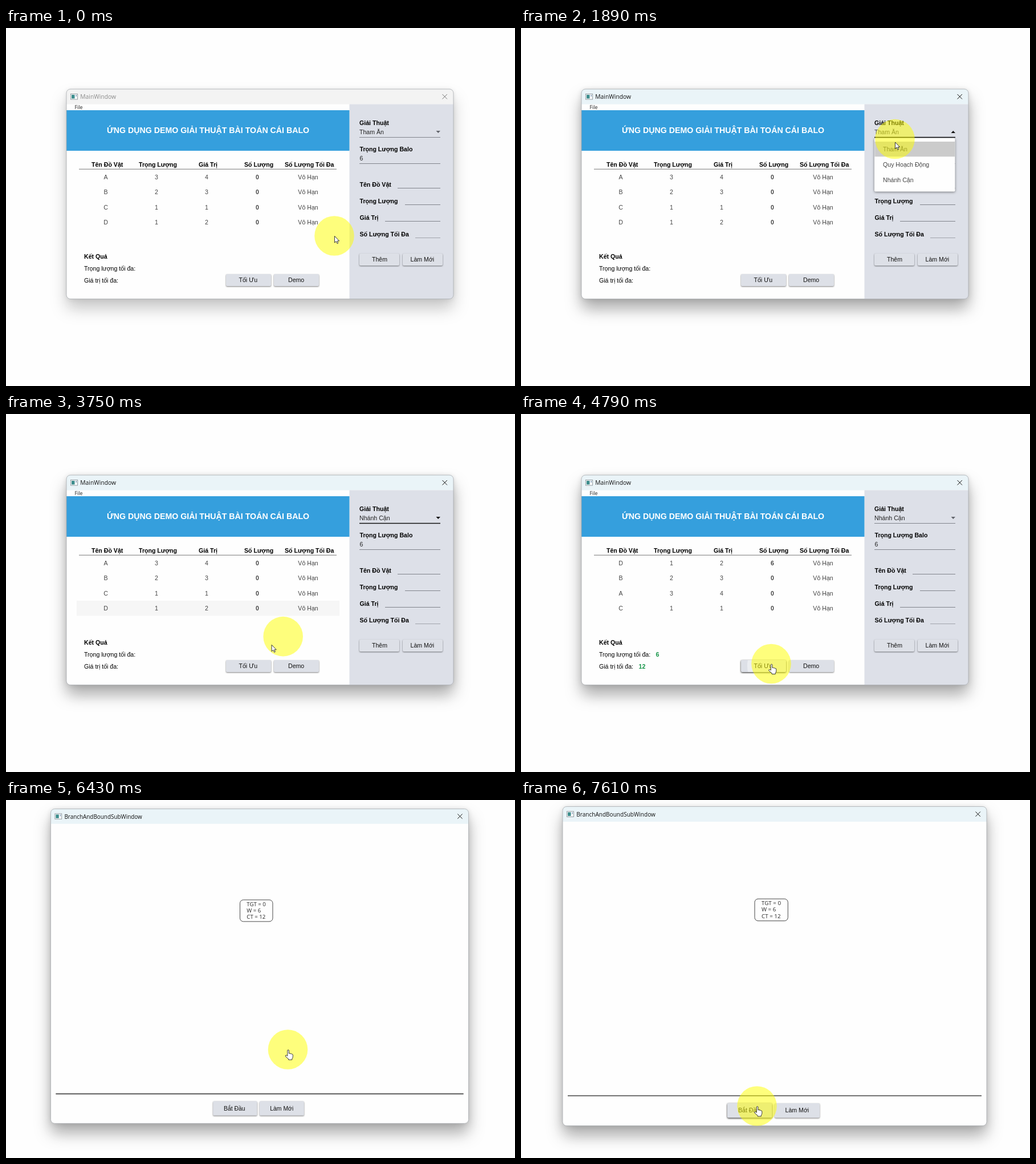
Write an HTML page that moves like this. It is 893 by 627 pixels and loops after 8000 ms.

```html
<!DOCTYPE html>
<html lang="vi">
<head>
<meta charset="utf-8">
<title>Balo</title>
<style>
  html, body { margin: 0; width: 100%; height: 100%; overflow: hidden; background: #fefefe; }
  svg { display: block; width: 893px; height: 627px; font: 10.6px "Liberation Sans", Arial, sans-serif; }
  .b { font-weight: bold; }
  .ui { font-family: "Open Sans", "Noto Sans", sans-serif; }
  .mid { text-anchor: middle; }
  .cell { fill: #444; }
  .frame { fill: #fefefe; filter: drop-shadow(0 17px 14px rgba(0,0,0,.3)) drop-shadow(0 1px 5px rgba(0,0,0,.14)); }
  .idle .frame { filter: drop-shadow(0 17px 14px rgba(0,0,0,.2)) drop-shadow(0 1px 4px rgba(0,0,0,.1)); }
  .edge { fill: none; stroke: #a9adb0; stroke-width: .8; }
  .bar { fill: #eaf4f8; }
  .idle .bar { fill: #f3f3f3; }
  .caption { fill: #111; }
  .close { stroke: #111; fill: none; }
  .idle .caption { fill: #8b8b8b; }
  .idle .close { stroke: #777; }
  .line { stroke: #81848c; }
  .face { fill: #dde0e7; filter: drop-shadow(0 1px 1.2px rgba(0,0,0,.5)); }
  .hot .face { filter: drop-shadow(0 1px 1.5px rgba(0,0,0,.9)); }
  .ripple { fill: #fff; }
  .result { fill: #149447; }
  .sheet { fill: #fefefe; filter: drop-shadow(0 1px 2px rgba(0,0,0,.5)); }
</style>
</head>
<body>
<svg id="stage" viewBox="0 0 893 627"></svg>
<script>
const LOOP = 8000, LAG = 38;
const ROW_TOP = 247.8, ROW_H = 26.4;
const COLUMNS = [175, 264, 352, 441, 530];

const text = (x, y, s, cls = '', extra = '') => `<text x="${x}" y="${y}" class="${cls}" ${extra}>${s}</text>`;
const rect = (x, y, w, h, extra = '') => `<rect x="${x}" y="${y}" width="${w}" height="${h}" ${extra}/>`;
const line = (x1, x2, y, extra = '') => `<path class="line" d="M${x1} ${y}H${x2}" ${extra}/>`;

const button = (id, x, y, w, h, label, labelX) => `
  <g id="${id}">
    <clipPath id="${id}Clip">${rect(x, y, w, h, 'rx="2"')}</clipPath>
    ${rect(x, y, w, h, 'rx="2" class="face"')}
    <circle class="ripple" r="0" clip-path="url(#${id}Clip)"/>
    ${text(labelX, y + h / 2 + 3.6, label, '', 'fill="#111"')}
  </g>`;

// Body is painted between the window surface and its outline.
const windowFrame = (x, y, w, h, title, size, body) => `
  ${rect(x, y, w, h, 'rx="7" class="frame"')}
  <path class="bar" d="M${x} ${y + 26.5}v-19.5q0-7 7-7h${w - 14}q7 0 7 7v19.5z"/>
  ${rect(x + 7.5, y + 8.5, 12, 9.5, 'fill="#fff" stroke="#8a9499" stroke-width=".9"')}
  ${rect(x + 9, y + 10, 5.5, 6.5, 'fill="#3b8c8c"')}
  ${rect(x + 16.5, y + 10, 1.5, 3, 'fill="#7d9ab8"')}
  ${text(x + 24.3, y + 17.3, title, 'ui caption', `font-size="${size}"`)}
  <path class="close" d="M${x + w - 19.5} ${y + 9}l8.4 8.4m0-8.4l-8.4 8.4"/>
  ${body}
  ${rect(x, y, w, h, 'rx="7" class="edge"')}`;

const table = (id, rows) => `<g id="${id}">${rows.map((row, r) =>
  [...row, 'Vô Hạn'].map((cell, c) =>
    text(COLUMNS[c], 264.8 + r * ROW_H, cell, 'mid cell' + (c === 3 ? ' b' : ''))).join('')).join('')}</g>`;

const headers = [[150, 'Tên Đồ Vật'], [233, 'Trọng Lượng'], [338, 'Giá Trị'], [418, 'Số Lượng'], [489, 'Số Lượng Tối Đa']];
const fields = [['Tên Đồ Vật', 687], ['Trọng Lượng', 700], ['Giá Trị', 665], ['Số Lượng Tối Đa', 718]];
const options = ['Tham Ăn', 'Quy Hoạch Động', 'Nhánh Cận'];

const mainBody = `
  <path fill="#dde0e8" d="M602.5 133.5H785V467.500q0 7-7 7H602.500z"/>
  ${text(120.500, 142, 'File', 'ui', 'font-size="8.8" fill="#222"')}
  ${rect(106, 144, 496.5, 71, 'fill="#359fdd"')}
  ${text(177, 184.4, 'ỨNG DỤNG DEMO GIẢI THUẬT BÀI TOÁN CÁI BALO', 'b', 'font-size="14.2" fill="#fff"')}
  ${[0, 1, 2, 3].map(r => rect(124, ROW_TOP + r * ROW_H, 461, ROW_H, 'class="row" fill="#f0f0f0"')).join('')}
  ${headers.map(([x, s]) => text(x, 242.7, s, 'b')).join('')}
  ${line(128, 580, 247.2, 'style="stroke:#777"')}
  ${table('before', [['A', 3, 4, 0], ['B', 2, 3, 0], ['C', 1, 1, 0], ['D', 1, 2, 0]])}
  ${table('after', [['D', 1, 2, 6], ['B', 2, 3, 0], ['A', 3, 4, 0], ['C', 1, 1, 0]])}
  ${text(137, 403.6, 'Kết Quả', 'b')}
  ${text(137, 425, 'Trọng lượng tối đa:')}
  ${text(137, 446, 'Giá trị tối đa:')}
  <g id="results">${text(236.5, 425, 6, 'b result')}${text(206.5, 446, 12, 'b result')}</g>
  ${button('best', 386, 431, 79, 21, 'Tối Ưu', 408.5)}
  ${button('demo', 470, 431, 79, 21, 'Demo', 495)}
  ${text(620, 169.8, 'Giải Thuật', 'b')}
  ${text(620, 186, '', '', 'id="choice" fill="#222"')}
  <path id="arrow" d="M754.500 180h7.500l-3.750 4z"/>
  <path id="underline" d="M620 191.500H762"/>
  ${text(620.5, 215.8, 'Trọng Lượng Balo', 'b')}
  ${text(620.5, 231.5, 6, '', 'fill="#222"')}
  ${line(620, 762, 237.5)}
  ${fields.map(([s, x], i) => text(620.5, 278 + i * 29.1, s, 'b') +
    line(x, 762, 280.5 + i * 29, i === 3 ? 'opacity=".65"' : '')).join('')}
  ${button('add', 620, 395, 70, 21, 'Thêm', 642)}
  ${button('reset', 696, 395, 70, 21, 'Làm Mới', 709.5)}
  <clipPath id="popupClip"><rect id="popupWindow" x="610" y="188" width="162" height="0"/></clipPath>
  <g id="popup" clip-path="url(#popupClip)">
    ${rect(620, 193, 141.5, 93.500, 'rx="2" class="sheet"')}
    ${options.map((s, i) => rect(620.5, 199 + i * 26.5, 140.5, 26.5, 'class="option"') +
      text(635, 216 + i * 26.8, s, '', 'fill="#444"')).join('')}
  </g>`;

const subBody = `
  ${rect(410, 173.2, 58.3, 38.5, 'rx="6" fill="#fefefe" stroke="#333" stroke-width=".9"')}
  ${['TGT = 0', 'W = 6', 'CT = 12'].map((s, i) => text(422, 184 + i * 11.3, s, 'ui', 'font-size="9.8" fill="#222"')).join('')}
  ${line(82, 808, 518, 'style="stroke:#444;stroke-width:1.7"')}
  ${button('start', 362, 531, 78.5, 25.500, 'Bắt Đầu', 381)}
  ${button('again', 445, 531, 79, 25.5, 'Làm Mới', 463.5)}`;

stage.innerHTML = `
  <g id="mainWin">${windowFrame(106, 107, 679, 367.5, 'MainWindow', 10.3, mainBody)}</g>
  <g id="subWin">${windowFrame(73, 11.5, 744, 559, 'BranchAndBoundSubWindow', 10.05, subBody)}</g>
  <circle id="halo" r="34.8" fill="#ff0" fill-opacity=".51"/>
  <g id="pointer" fill="#fff" stroke="#222" stroke-width=".9" stroke-linejoin="round">
    <path id="arrowCursor" d="M.5.5V12L3.200 9.500 5 13.500 6.800 12.700 5.100 9H8.700Z"/>
    <path id="handCursor" d="M-.7 2a1.300 1.300 0 0 1 2.600 0V7q2-.8 2.600.4 2-.6 2.300.7 2-.3 2 1.500V12.500q0 2-1.500 3.700V18h-6.200v-1.500L-3.700 12.500q-1.300-2 .2-2.600 1.300-.2 2.800 1.500Z"/>
  </g>`;

const $ = id => document.getElementById(id);
const rowEls = document.querySelectorAll('.row');
const optionEls = document.querySelectorAll('.option');

// [time, x, y]
const PATH = [
  [0, 576, 364], [480, 576, 364], [750, 595, 312], [950, 619, 225], [1070, 645, 192.5], [1220, 656, 188],
  [1750, 656, 188], [2110, 656, 233], [2300, 657, 250], [2520, 659, 264], [3300, 659, 264], [3560, 588, 324],
  [3750, 466, 403.5], [3900, 438, 434], [4080, 438.500, 436.500], [4200, 439, 437.500], [5210, 439, 437.500],
  [5290, 455, 437.200], [5380, 480, 437], [5480, 494.500, 437], [6840, 494.500, 437],
  [7150, 455, 482], [7400, 421, 529], [7580, 414, 536], [LOOP, 414, 536]
];

const clamp = v => Math.max(0, Math.min(1, v));
const ramp = (t, from, to) => clamp((t - from) / (to - from));
const within = (v, from, to) => v >= from && v < to;
const show = (el, on) => { el.style.display = on ? '' : 'none'; };

function slope(i, axis) {
  const a = PATH[i - 1], p = PATH[i], b = PATH[i + 1];
  const rests = q => q[1] === p[1] && q[2] === p[2];
  if (!a || !b || rests(a) || rests(b)) return 0;
  return (b[axis] - a[axis]) / (b[0] - a[0]);
}

function cursorAt(time) {
  const t = Math.max(0, time);
  let i = 0;
  while (i < PATH.length - 2 && PATH[i + 1][0] <= t) i++;
  const a = PATH[i], b = PATH[i + 1], d = b[0] - a[0], u = (t - a[0]) / d;
  return [1, 2].map(k =>
    (2 * u ** 3 - 3 * u * u + 1) * a[k] + (u ** 3 - 2 * u * u + u) * d * slope(i, k) +
    (3 * u * u - 2 * u ** 3) * b[k] + (u ** 3 - u * u) * d * slope(i + 1, k));
}

// Row highlight fades out after the pointer leaves.
function rowGlow(t, r) {
  for (let k = 0; k <= 12; k++) {
    const [x, y] = cursorAt(t - k * 20);
    if (within(x, 124, 585) && within(y, ROW_TOP + r * ROW_H, ROW_TOP + (r + 1) * ROW_H)) return 1 - k / 13;
  }
  return 0;
}

function ripple(id, t, from, x, y) {
  const el = $(id).querySelector('.ripple'), on = within(t, from, from + 600);
  el.setAttribute('cx', x);
  el.setAttribute('cy', y);
  el.setAttribute('r', on ? 56 * ramp(t, from, from + 400) : 0);
  el.setAttribute('opacity', .4 * (1 - ramp(t, from + 330, from + 600)));
}

function draw(t) {
  const [x, y] = cursorAt(t), [hx, hy] = cursorAt(t - LAG);
  const open = within(t, 1320, 2930), focused = within(t, 1320, 4480), solved = t >= 4520;
  const subOpen = t >= 6220;

  $('mainWin').setAttribute('class', within(t, 1320, 6220) ? '' : 'idle');
  show($('before'), !solved);
  show($('after'), solved);
  show($('results'), solved);
  rowEls.forEach((el, r) => el.setAttribute('opacity', rowGlow(t, r)));

  $('choice').textContent = options[t < 2930 ? 0 : 2];
  $('choice').setAttribute('opacity', open ? .8 : 1);
  $('arrow').setAttribute('fill', focused ? '#111' : '#62656c');
  $('arrow').setAttribute('transform', open ? 'rotate(180 758.25 182)' : '');
  $('underline').setAttribute('stroke', focused ? '#111' : '#81848c');
  $('underline').setAttribute('stroke-width', focused ? 1.7 : 1);

  const grow = 1 - (1 - ramp(t, 1360, 1700)) ** 3;
  $('popupWindow').setAttribute('height', 104 * grow);
  $('popup').setAttribute('opacity', ramp(t, 1340, 1500) * (1 - ramp(t, 2900, 3040)));
  optionEls.forEach((el, i) => {
    const hover = open && within(y, 199 + i * 26.5, 225.5 + i * 26.5);
    el.setAttribute('fill', i === 0 ? '#cbcbcb' : hover ? '#e0e0e0' : '#fefefe');
  });

  const over = (left, top, w, h) => within(x, left, left + w) && within(y, top, top + h);
  const onBest = !subOpen && over(386, 431, 79, 21);
  const onDemo = !subOpen && over(470, 431, 79, 21);
  const onStart = subOpen && over(362, 531, 78.5, 25.5);
  $('best').setAttribute('class', onBest ? 'hot' : '');
  $('demo').setAttribute('class', onDemo ? 'hot' : '');
  $('start').setAttribute('class', onStart ? 'hot' : '');
  ripple('best', t, 4490, 439, 441);
  ripple('demo', t, 5860, 494.5, 441);

  const zoom = 1 - .12 * (1 - ramp(t, 6220, 6500)) ** 1.5;
  show($('subWin'), subOpen);
  $('subWin').setAttribute('transform', `translate(445 291) scale(${zoom}) translate(-445 -291)`);
  $('subWin').setAttribute('opacity', ramp(t, 6200, 6400));

  const hand = onBest || onDemo || onStart || within(t, 6220, 6860);
  show($('handCursor'), hand);
  show($('arrowCursor'), !hand);
  $('pointer').setAttribute('transform', `translate(${x} ${y})`);
  $('halo').setAttribute('cx', hx);
  $('halo').setAttribute('cy', hy);
}

const began = performance.now();
function tick() {
  draw((performance.now() - began) % LOOP);
  requestAnimationFrame(tick);
}
tick();
</script>
</body>
</html>
```
